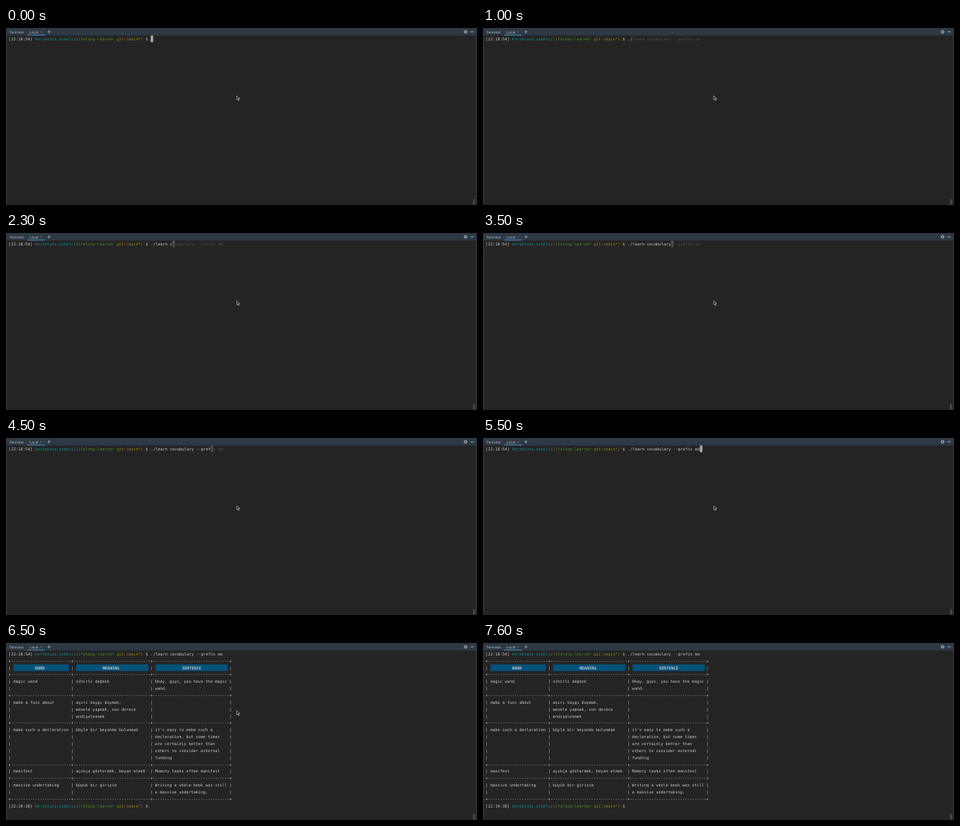
These frames come from a looping animation (600 px wide and 227 px high, 7800 ms). An HTML page:

```html
<!DOCTYPE html>
<html lang="en">
<head>
<meta charset="utf-8">
<title>Terminal session</title>
<style>
  html, body { margin: 0; width: 100%; height: 100%; overflow: hidden; background: #242424; }
  svg { display: block; width: 600px; height: 227px; }
  text { white-space: pre; text-rendering: geometricPrecision; }
  .mono { font-family: "DejaVu Sans Mono", monospace; font-size: 5.096px; fill: #c8c8c8; }
  .ui { font-family: Inter, sans-serif; font-size: 4.4px; fill: #c0c5ca; }
</style>
</head>
<body>
<svg id="stage" viewBox="0 0 600 227" xmlns="http://www.w3.org/2000/svg">
  <rect width="600" height="227" fill="#242424"/>
  <rect y="9" width="1.4" height="218" fill="#30363b"/>
  <rect x="598.6" y="9" width="1.4" height="218" fill="#30363b"/>
  <rect x="595" y="219.5" width="2.4" height="7" fill="#4b4b4b"/>
  <rect width="600" height="9.6" fill="#2d3945"/>
  <rect x="27" y="8.4" width="22.5" height="1.2" fill="#4380b4"/>
  <text class="ui" x="4" y="6.5">Terminal:</text>
  <text class="ui" x="30" y="6.5">Local</text>
  <path d="M43.8 4.2l1.8 1.8m0-1.8l-1.8 1.8" stroke="#7c858d" stroke-width=".5"/>
  <path d="M52.7 4.9h4M54.7 2.9v4" stroke="#aeb5bb" stroke-width=".7"/>
  <g fill="none" stroke="#bac0c5">
    <circle cx="585.5" cy="4.9" r="1.4" stroke-width="1"/>
    <circle cx="585.5" cy="4.9" r="2.1" stroke-width=".7" stroke-dasharray=".8 .85"/>
    <path d="M591.8 4.9h4" stroke-width=".8"/>
  </g>
  <g id="screen"></g>
  <path id="mouse" d="M0 0v5.2l1.2-1.1 .9 2 .9-.4-.9-1.9h1.7z"
        fill="#181818" stroke="#dedede" stroke-width=".55" stroke-linejoin="round"/>
</svg>
<script>
const NS = "http://www.w3.org/2000/svg";
const LOOP = 7800;
const CELL = 3.068, PITCH = 8.864, BAR = 8.5, LEFT = 3.34, TOP = 9.7;
const INK = "#c8c8c8", GHOST = "#505050", BACK = "#242424", BLOCK = "#b2b2b2";
const COMMAND = "./learn vocabulary --prefix ma";
const PROMPT_END = 59;
const WIDTHS = [23, 30, 30];
const STARTS = [2, 28, 61];
const RUN_AT = 5800, PROMPT_AT = 6000;

// Moments at which the typed length grows by one character.
const KEYS = [100, 500, 1400, 1500, 1600, 1800, 2000, 2100, 2300, 2500,
  2600, 2600, 2800, 2900, 3100, 3300, 3300, 3500, 3600, 3800,
  4000, 4200, 4300, 4400, 4500, 4600, 4800, 5000, 5100, 5200];

const ENTRIES = [
  ["magic wand", ["sihirli değnek"], ["Okay, guys, you have the magic", "wand."]],
  ["make a fuss about", ["aşırı kaygı duymak,", "mesele yapmak, son derece", "endişelenmek"], []],
  ["make such a declaration", ["böyle bir beyanda bulunmak"],
    ["it's easy to make such a", "declaration, but some times", "are certainly better than",
      "others to consider external", "funding"]],
  ["manifest", ["açıkça göstermek, beyan etmek"], ["Memory leaks often manifest"]],
  ["massive undertaking", ["büyük bir girişim"],
    ["Writing a whole book was still", "a massive undertaking."]]
];

const screen = document.getElementById("screen");
const mouse = document.getElementById("mouse");
const colX = col => LEFT + col * CELL;
const rowY = row => TOP + row * PITCH;

function add(parent, tag, attrs = {}) {
  const node = document.createElementNS(NS, tag);
  for (const key in attrs) node.setAttribute(key, attrs[key]);
  return parent.appendChild(node);
}

function write(parent, row, col, text, attrs = {}) {
  const node = add(parent, "text", { class: "mono", x: colX(col), y: rowY(row) + 6.1, ...attrs });
  node.textContent = text;
  return node;
}

function span(parent, fill, text = "") {
  const node = add(parent, "tspan");
  node.style.fill = fill;
  node.textContent = text;
  return node;
}

function prompt(parent, row, clock) {
  const line = write(parent, row, 0, "");
  span(line, INK, `[${clock}] `);
  span(line, "#118d8d", "kerimtuna.ozbeli");
  span(line, INK, ":");
  span(line, "#4b8c20", "lifelong-learner ");
  span(line, "#9c8512", "git:(main*) ");
  span(line, INK, "$");
}

function tableRow(parent, row, cells) {
  const line = WIDTHS.map((width, i) => ` ${(cells[i] || "").padEnd(width)} `).join("|");
  write(parent, row, 0, `|${line}|`);
}

function table(parent) {
  const rule = "+" + WIDTHS.map(w => "-".repeat(w + 2) + "+").join("");
  write(parent, 1, 0, rule);
  tableRow(parent, 2, []);
  ["WORD", "MEANING", "SENTENCE"].forEach((name, i) => {
    add(parent, "rect", { x: colX(STARTS[i]), y: rowY(2), width: WIDTHS[i] * CELL,
      height: BAR, fill: "#04537d" });
    const pad = Math.floor((WIDTHS[i] - name.length) / 2);
    write(parent, 2, STARTS[i] + pad, name, { "font-weight": "bold" });
  });
  write(parent, 3, 0, rule);
  let row = 4;
  for (const [word, meaning, sentence] of ENTRIES) {
    const height = Math.max(meaning.length, sentence.length);
    for (let i = 0; i < height; i++) {
      tableRow(parent, row++, [i ? "" : word, meaning[i], sentence[i]]);
    }
    write(parent, row++, 0, rule);
  }
}

prompt(screen, 0, "22:18:54");
const output = add(screen, "g");
table(output);
const nextPrompt = add(screen, "g");
prompt(nextPrompt, 22, "22:19:38");
const caret = add(screen, "rect", { width: CELL, height: BAR });
const commandLine = write(screen, 0, PROMPT_END, "");
const typedPart = span(commandLine, INK);
const caretPart = span(commandLine, BACK);
const ghostPart = span(commandLine, GHOST);

const show = (node, on) => node.setAttribute("visibility", on ? "visible" : "hidden");

function caretOn(t) {
  if (t < RUN_AT) return t < 1000 || t >= 1400;
  return t < 6500 || (t >= 7000 && t < 7600);
}

function placeCaret(row, col, fill) {
  caret.setAttribute("x", colX(col));
  caret.setAttribute("y", rowY(row));
  caret.setAttribute("fill", fill);
}

function render(t) {
  const typed = KEYS.filter(at => at <= t).length;
  const on = caretOn(t);
  const hint = typed ? COMMAND.slice(typed) : "";
  typedPart.textContent = COMMAND.slice(0, typed);
  caretPart.textContent = hint.slice(0, 1);
  caretPart.style.fill = on ? BACK : GHOST;
  ghostPart.textContent = hint.slice(1);

  if (t < RUN_AT) placeCaret(0, PROMPT_END + typed, hint ? GHOST : BLOCK);
  else placeCaret(22, t < PROMPT_AT ? 0 : PROMPT_END, BLOCK);
  show(caret, on);
  show(output, t >= RUN_AT);
  show(nextPrompt, t >= PROMPT_AT);

  const p = Math.min(1, Math.max(0, (t - 6800) / 400));
  const ease = p * p * (3 - 2 * p);
  mouse.setAttribute("transform", `translate(${294 + 20 * ease} ${86.8 + 9 * ease})`);
  show(mouse, t < 7300);
}

const start = performance.now();
function tick() {
  render((performance.now() - start) % LOOP);
  requestAnimationFrame(tick);
}
tick();
</script>
</body>
</html>
```
